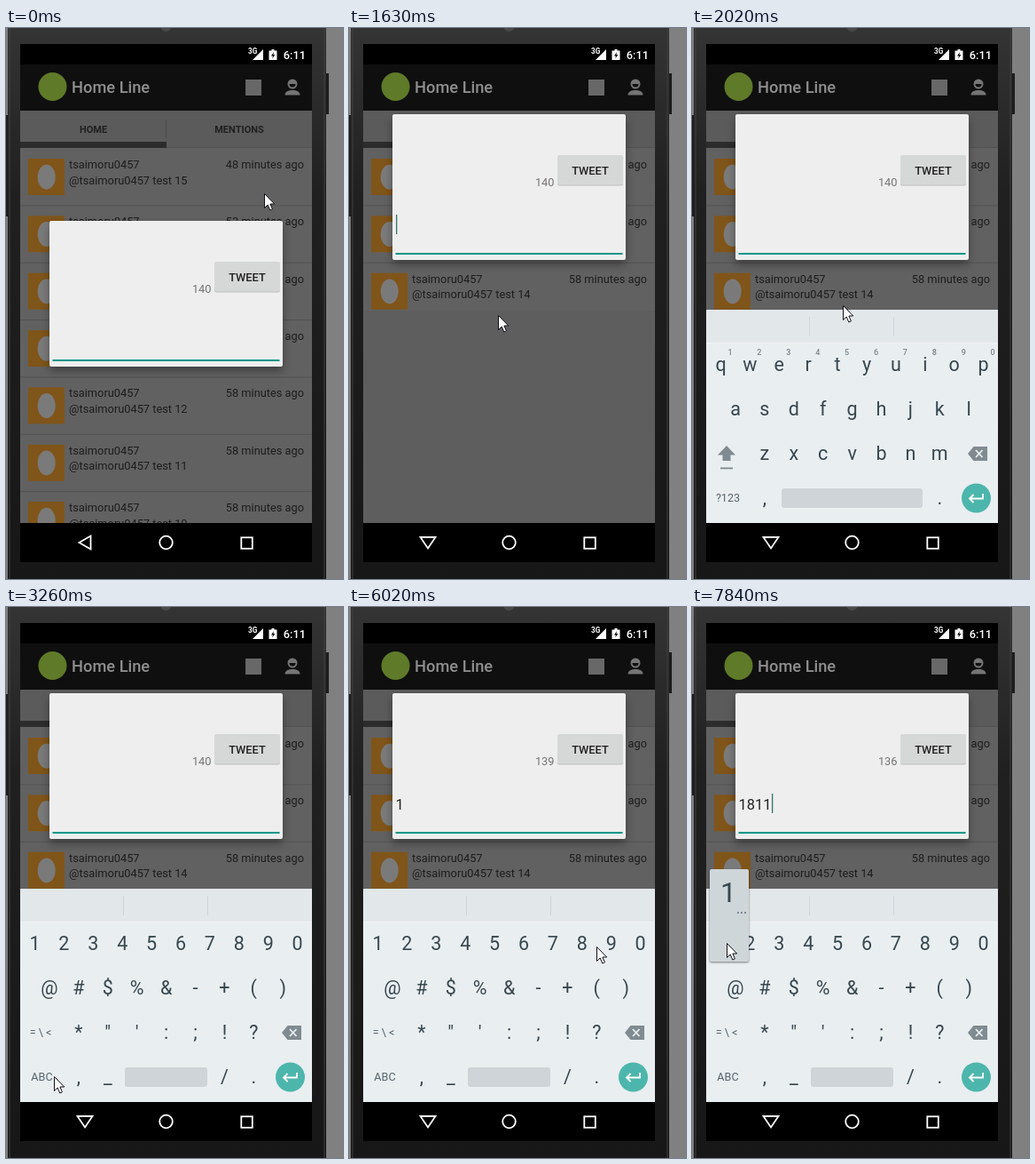
An HTML page for the animation above (7990 ms loop, 380x620 px).

```html
<!DOCTYPE html>
<html lang="en">
<head>
<meta charset="utf-8">
<title>Home Line</title>
<style>
  html, body { margin: 0; width: 100%; height: 100%; overflow: hidden; background: #808080; }
  svg { display: block; width: 380px; height: 620px; font-family: Roboto, sans-serif; }
  .mid { text-anchor: middle; }
  .end { text-anchor: end; }
  .med { font-weight: 500; }
  .row { font-size: 12.8px; fill: #1d1d1d; }
  .tab { font-size: 11px; font-weight: 700; fill: #202020; }
  .key { font-size: 21.5px; fill: #37474f; }
  .hint { font-size: 9px; font-weight: 500; fill: #7b878d; }
  .mode { font-size: 12.6px; fill: #56656d; }
  .line { fill: none; stroke: #fff; stroke-width: 1.8; }
  #dialog { filter: drop-shadow(0 5px 5px rgba(0, 0, 0, .35)); }
  #popup { filter: drop-shadow(0 1px 1px rgba(0, 0, 0, .5)); }
</style>
</head>
<body>
<svg viewBox="0 0 380 620">
  <defs>
    <clipPath id="listClip"><rect id="listBox" x="16" y="135" width="329" height="422"/></clipPath>
    <linearGradient id="bezel" x2="0" y2="1">
      <stop offset="0" stop-color="#343434"/><stop offset=".3" stop-color="#202020"/><stop offset="1" stop-color="#171717"/>
    </linearGradient>
  </defs>

  <!-- handset -->
  <rect width="380" height="620" fill="#808080"/>
  <path d="M0 98h3v114H0zM360 51h4v46h-4z" fill="#1d1d1d"/>
  <rect x="2" width="359" height="620" fill="url(#bezel)"/>
  <path d="M4 0V620M359 0V620" stroke="#404040"/>
  <circle cx="180.5" cy="-2" r="6" fill="#4a4a4a"/>

  <!-- status and action bars -->
  <rect x="16" y="18" width="329" height="583"/>
  <rect x="16" y="41" width="329" height="52" fill="#0f0f0f"/>
  <text x="273" y="29" font-size="8.2" font-weight="700" fill="#fff">3G</text>
  <path d="M290 24V36H278z" fill="#fff"/>
  <path d="M296.500 25.500h3V24h3v1.500h3V36h-9z" fill="#fff"/>
  <path d="M302 27l-3 4.500h2l-.8 3 3.200-4.500h-2z"/>
  <text class="med end" x="338" y="34.500" font-size="12.800" fill="#fff">6:11</text>
  <circle cx="52.500" cy="66" r="16" fill="#5f7a28"/>
  <text class="med" x="74" y="73" font-size="18.280" fill="#8f8f8f">Home Line</text>
  <rect x="270" y="58" width="18" height="18" fill="#686868"/>
  <g fill="#757575">
    <circle cx="323" cy="63" r="5.500"/>
    <path d="M314.500 75.500c0-4 4-5.500 8.500-5.500s8.500 1.500 8.500 5.500z"/>
    <path d="M319.500 63h7a3.500 3.500 0 0 1-7 0z" fill="#0f0f0f"/>
  </g>

  <!-- tabs and list -->
  <rect x="16" y="93" width="329" height="464" fill="#5e5e5e"/>
  <rect x="16" y="93" width="329" height="42" fill="#5b5b5b"/>
  <path d="M180.500 103v21M16 135H345" stroke="#494949"/>
  <rect x="16" y="128" width="165" height="7" fill="#2c2c2c"/>
  <text class="tab mid" x="98.500" y="118">HOME</text>
  <text class="tab mid" x="263" y="118">MENTIONS</text>
  <g clip-path="url(#listClip)">
    <rect x="16" y="135" width="329" height="422" fill="#616161"/>
    <g id="list"></g>
  </g>

  <!-- compose dialog -->
  <g id="dialog">
    <rect x="49" y="217" width="263" height="164" rx="2" fill="#eee"/>
    <rect x="235" y="264" width="74" height="33.500" rx="2" fill="#bfc0c0"/>
    <rect x="235" y="263" width="74" height="33.500" rx="2" fill="#d6d7d7"/>
    <text class="med mid" x="272" y="284.500" font-size="12.800" fill="#212121">TWEET</text>
    <text id="count" class="end" x="231.500" y="298" font-size="12.800" fill="#757575"></text>
    <rect x="52.500" y="373" width="256" height="2" fill="#009688"/>
    <text id="typed" x="52.500" y="348" font-size="16.450" fill="#212121"></text>
    <rect id="caret" y="330" width="1.300" height="22" fill="#33736d"/>
  </g>

  <!-- keyboard -->
  <g id="board">
    <rect x="16" y="317" width="329" height="240" fill="#e9eef1"/>
    <rect x="16" y="317" width="329" height="37" fill="#e2e7ea"/>
    <path d="M16 354.500H345" stroke="#f1f4f6"/>
    <path d="M132.500 325v22M227.500 325v22" stroke="#cfd6da"/>
    <g id="letters">
      <path d="M39 470l10 10.500h-5.500V487h-9v-6.500H29z" fill="#7f8b91"/>
      <rect x="32" y="494.500" width="14" height="1.800" fill="#7f8b91"/>
      <rect x="101" y="518" width="159" height="22" rx="3" fill="#cfd4d8"/>
      <text class="mode mid" x="40.500" y="533">?123</text>
    </g>
    <g id="symbols">
      <rect x="134" y="518" width="93" height="22" rx="3" fill="#cfd4d8"/>
      <text class="mode mid" x="39" y="483">= \ &lt;</text>
      <text class="mode mid" x="40.500" y="533">ABC</text>
    </g>
    <path d="M311 479l6.500-8H333v16h-15.500z" fill="#7f8b91"/>
    <path d="M320 475l7.500 8m0-8l-7.500 8" stroke="#e9eef1" stroke-width="1.800"/>
    <circle cx="320.500" cy="529" r="16.500" fill="#4db6ac"/>
    <path d="M328 524v5.500H313m4.500-4.500l-4.500 4.500 4.500 4.500" class="line"/>
  </g>

  <!-- navigation bar -->
  <path id="back" class="line" d="M82.500 579l13-7.500v15z"/>
  <path id="hide" class="line" d="M80.500 573h17l-8.500 12.500z"/>
  <circle class="line" cx="180.500" cy="579" r="7.300"/>
  <rect class="line" x="265.300" y="573.300" width="12.500" height="12.500"/>

  <g id="popup">
    <rect x="20" y="295" width="44" height="104" rx="2" fill="#cfd6da"/>
    <text class="mid" x="41" y="332" font-size="32" fill="#37474f">1</text>
    <path d="M51 344h10" stroke="#7f8b91" stroke-width="2" stroke-dasharray="2"/>
  </g>
  <path id="mouse" d="M.5.500V16.500L4.200 13l2.600 6 2.600-1.200L6.900 12H11.700z" fill="#fff" stroke="#101018"/>
</svg>
<script>
const LOOP = 7990, STEP = 136, BLINK = 500;
const $ = id => document.getElementById(id);

function add(parent, tag, attrs, text) {
  const el = document.createElementNS('http://www.w3.org/2000/svg', tag);
  for (const k in attrs) el.setAttribute(k, attrs[k]);
  if (text) el.textContent = text;
  $(parent).append(el);
}

// timeline rows
const USER = 'tsaimoru0457', ROW = 64.35;
for (let i = 0; i < 7; i++) {
  const y = 135 + i * ROW;
  add('list', 'rect', { x: 25, y: y + 12, width: 41, height: 41, fill: '#80551a' });
  add('list', 'ellipse', { cx: 45.7, cy: y + 32.7, rx: 10, ry: 14, fill: '#7a7a7a' });
  add('list', 'text', { class: 'row', x: 71, y: y + 23 }, USER);
  add('list', 'text', { class: 'row', x: 71, y: y + 40.5 }, `@${USER} test ${Math.min(15, 16 - i)}`);
  add('list', 'text', { class: 'row end', x: 336, y: y + 23 }, Math.min(58, 48 + 5 * i) + ' minutes ago');
  add('list', 'rect', { x: 16, y: y + ROW, width: 329, height: 1, fill: '#535353' });
}

// key caps: a space leaves a slot empty
const PITCH = 32.9;
function keys(id, rows) {
  rows.forEach((row, r) => [...row].forEach((c, i) => {
    const x = (r ? 49 : 32.5) + i * PITCH;
    if (c !== ' ') add(id, 'text', { class: 'key mid', x, y: 386 + 50 * r }, c);
  }));
}
keys('letters', ['qwertyuiop', 'asdfghjkl', ' zxcvbnm', ' ,     .']);
keys('symbols', ['1234567890', '@#$%&-+()', ' *"\':;!?', ' ,_   /.']);
for (let i = 0; i < 10; i++)
  add('letters', 'text', { class: 'hint mid', x: 43 + i * PITCH, y: 368 }, String((i + 1) % 10));

// pointer legs: arrival time, x, y, rest before leaving
const LEGS = [
  [0, 291, 186, 0], [530, 172, 325, 810], [1630, 168, 323, 260], [2020, 170, 312, 150],
  [3000, 54, 528, 400], [4080, 148, 440, 0], [4650, 62, 399, 0], [5100, 30, 377, 300],
  [5620, 316, 388, 0], [6140, 269, 380, 280], [7000, 41, 375, 200], [7410, 39, 378, 600]
];
const ease = k => k * k * (3 - 2 * k);

function pointerAt(t) {
  const i = LEGS.findLastIndex(leg => leg[0] <= t);
  const [t0, x0, y0, rest] = LEGS[i];
  const [t1, x1, y1] = LEGS[i + 1] || [LOOP, x0, y0];
  const k = ease(Math.max(0, t - t0 - rest) / Math.max(1, t1 - t0 - rest));
  return [x0 + (x1 - x0) * k, y0 + (y1 - y0) * k].map(Math.round);
}

const MESSAGE = '1811', STROKES = [5370, 6420, 7540, 7840];
const show = (id, on) => $(id).setAttribute('visibility', on ? 'visible' : 'hidden');
const move = (id, x, y) => $(id).setAttribute('transform', `translate(${x} ${y})`);

function draw() {
  const t = performance.now() % LOOP;
  const raised = t >= 1480, open = t >= 1890, symbolic = t >= 3120;
  const done = STROKES.filter(s => s <= t);
  const text = MESSAGE.slice(0, done.length);

  move('mouse', ...pointerAt(Math.floor((t + 20) / STEP) * STEP));
  move('dialog', 0, raised ? -120 : 0);
  $('listBox').setAttribute('height', raised ? 183 : 422);
  $('typed').textContent = text;
  $('count').textContent = 140 - text.length;
  $('caret').setAttribute('x', 53 + text.length * 9.24);
  show('caret', Math.floor((t - 390) / BLINK) % 2 === 0);
  show('popup', text.endsWith('1') && t - done.at(-1) < 150);
  show('board', open);
  show('letters', open && !symbolic);
  show('symbols', open && symbolic);
  show('back', t < 810);
  show('hide', t >= 810);
  requestAnimationFrame(draw);
}
draw();
</script>
</body>
</html>
```
